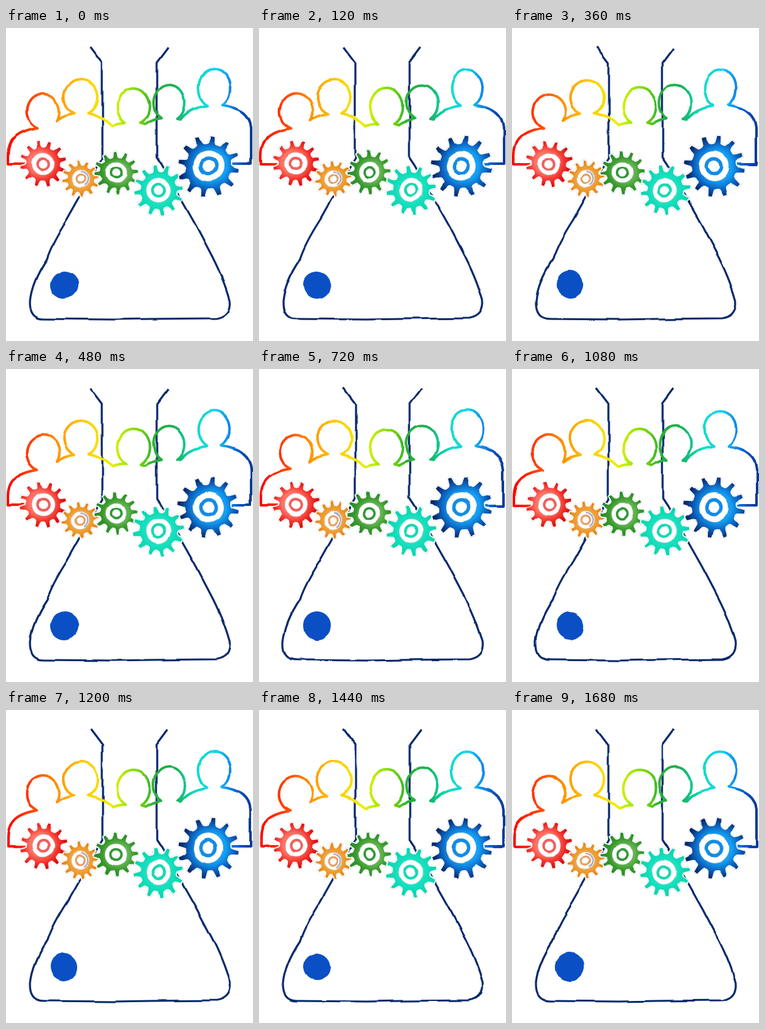
An HTML page for the animation above (1.8 s loop, 392 by 496 pixels).

```html
<!DOCTYPE html>
<html lang="en">
<head>
<meta charset="utf-8">
<title>Team, gears and flask</title>
<style>
  html, body { margin: 0; width: 100%; height: 100%; overflow: hidden; background: #fff; }
  svg { display: block; }
</style>
</head>
<body>
<svg width="392" height="496" viewBox="0 0 392 496" fill="none" stroke-linejoin="round">
  <defs>
    <filter id="wobble" filterUnits="userSpaceOnUse" x="0" y="0" width="392" height="496"
            color-interpolation-filters="sRGB">
      <feTurbulence id="noise" type="fractalNoise" baseFrequency=".022" numOctaves="1" result="n"/>
      <feDisplacementMap in="SourceGraphic" in2="n" scale="7"
                         xChannelSelector="R" yChannelSelector="G"/>
    </filter>
    <linearGradient id="rainbow" gradientUnits="userSpaceOnUse" x1="0" y1="0" x2="392" y2="0"></linearGradient>
  </defs>
  <g filter="url(#wobble)">
    <path stroke="#06296c" stroke-width="3.2"
          d="M134 30L153 55V206L147 216L119 265L97 304Q73 341 65 366Q41 402 38 433
             Q37 461 60 461L170 462L230 461L334 460Q357 456 355 432Q345 395 322 352
             L302 314L276 268L247 217L239 205V55L257 31"/>
    <path stroke="url(#rainbow)" stroke-width="4"
          d="M30 216H3V202C3 176 18 164 50 159A26 28 0 1 1 81 147Q92 138 109 136
             A27 28 0 1 1 131 135Q154 140 170 155Q178 151 190 151A26 30 0 1 1 215 151
             L222 153Q232 146 246 144A25 29 0 1 1 272 144L277 145Q290 127 320 123
             A25 30 0 1 1 343 122Q386 128 388 158V216H358"/>
    <circle cx="92" cy="407" r="22" fill="#0b4fc4"/>
    <g id="gears"></g>
  </g>
</svg>
<script>
const STEP = 120, STEPS = 15, TEETH = 12;
const byId = id => document.getElementById(id);
const noise = byId('noise');

const stops = list => list.map(([at, color]) => `<stop offset="${at}" stop-color="${color}"/>`).join('');

byId('rainbow').innerHTML = stops([
  [0, '#f00'], [.13, '#ff5200'], [.22, '#ff9a00'], [.31, '#ffc800'], [.42, '#f0ee00'],
  [.48, '#a8ec00'], [.55, '#70d010'], [.6, '#28b038'], [.68, '#18b050'], [.72, '#10c488'],
  [.77, '#10dcc4'], [.85, '#10d4f0'], [.9, '#1090ee'], [.95, '#0a50c0'], [1, '#08358c']
]);

function gearOutline(r, phase) {
  const pitch = 2 * Math.PI / TEETH;
  const at = (turn, size) => {
    const a = phase * Math.PI / 180 + turn * pitch;
    return `${(r * size * Math.cos(a)).toFixed(1)} ${(r * size * Math.sin(a)).toFixed(1)}`;
  };
  let d = 'M' + at(-.5, .72);
  for (let k = 0; k < TEETH; k++) {
    d += `Q${at(k - .25, .71)} ${at(k - .2, .8)}L${at(k - .11, .99)}L${at(k + .11, .99)}` +
         `L${at(k + .2, .8)}Q${at(k + .25, .71)} ${at(k + .5, .72)}`;
  }
  return d + 'Z';
}

// Colours run from the inner rim to the tips of the teeth.
function gear({ x, y, r, phase, hub, shade, colors, light }, i) {
  const d = gearOutline(r, phase);
  const last = colors.length - 1;
  const tint = stops(colors.map((c, k) => [.45 + .5 * k / last, c]));
  return `<radialGradient id="metal${i}" gradientUnits="userSpaceOnUse"
            cx="${light[0] * r}" cy="${light[1] * r}" r="${r * 1.05}">${tint}</radialGradient>
    <g transform="translate(${x} ${y})">
      <path d="${d}" stroke="#dcdce2" stroke-width="4"/>
      <path d="${d}" fill="#fff" stroke="#fff" stroke-width="2.8"/>
      <path d="${d}" fill="url(#metal${i})"/>
      <circle r="${r * .48}" fill="#fff" stroke="#ddd" stroke-width=".8"/>
      <path d="M0 ${-r * .4}A${r * .4} ${r * .4} 0 0 1 ${r * .2} ${r * .35}" stroke="${shade}" stroke-width="${r * .08}"/>
      <circle r="${r * .24}" stroke="${hub}" stroke-width="${r * .11}"/>
    </g>`;
}

byId('gears').innerHTML = [
  { x: 59, y: 215, r: 37, phase: -102, hub: '#f06060', shade: '#fff', light: [-.12, -.05],
    colors: ['#ff7468', '#f43830', '#dc1010'] },
  { x: 118, y: 239, r: 29, phase: -97, hub: '#e8a060', shade: '#a9a9c4', light: [0, 0],
    colors: ['#f0a848', '#ec9424', '#e08010'] },
  { x: 175, y: 229, r: 35, phase: -93, hub: '#309838', shade: '#fff', light: [.1, 0],
    colors: ['#62b450', '#38982c', '#2a8c2c'] },
  { x: 242, y: 257, r: 40, phase: -98, hub: '#18d8b4', shade: '#fff', light: [0, 0],
    colors: ['#1ce4c4', '#10dab6', '#0cd4ac'] },
  { x: 321, y: 219, r: 49, phase: -81, hub: '#148ce6', shade: '#fff', light: [.1, 0],
    colors: ['#14a0f4', '#0c64c0', '#062a6c'] }
].map(gear).join('');

let shown = -1;
function draw() {
  const step = Math.floor(performance.now() / STEP) % STEPS;
  if (step !== shown) noise.setAttribute('seed', 3 + 7 * (shown = step));
  requestAnimationFrame(draw);
}
draw();
</script>
</body>
</html>
```
